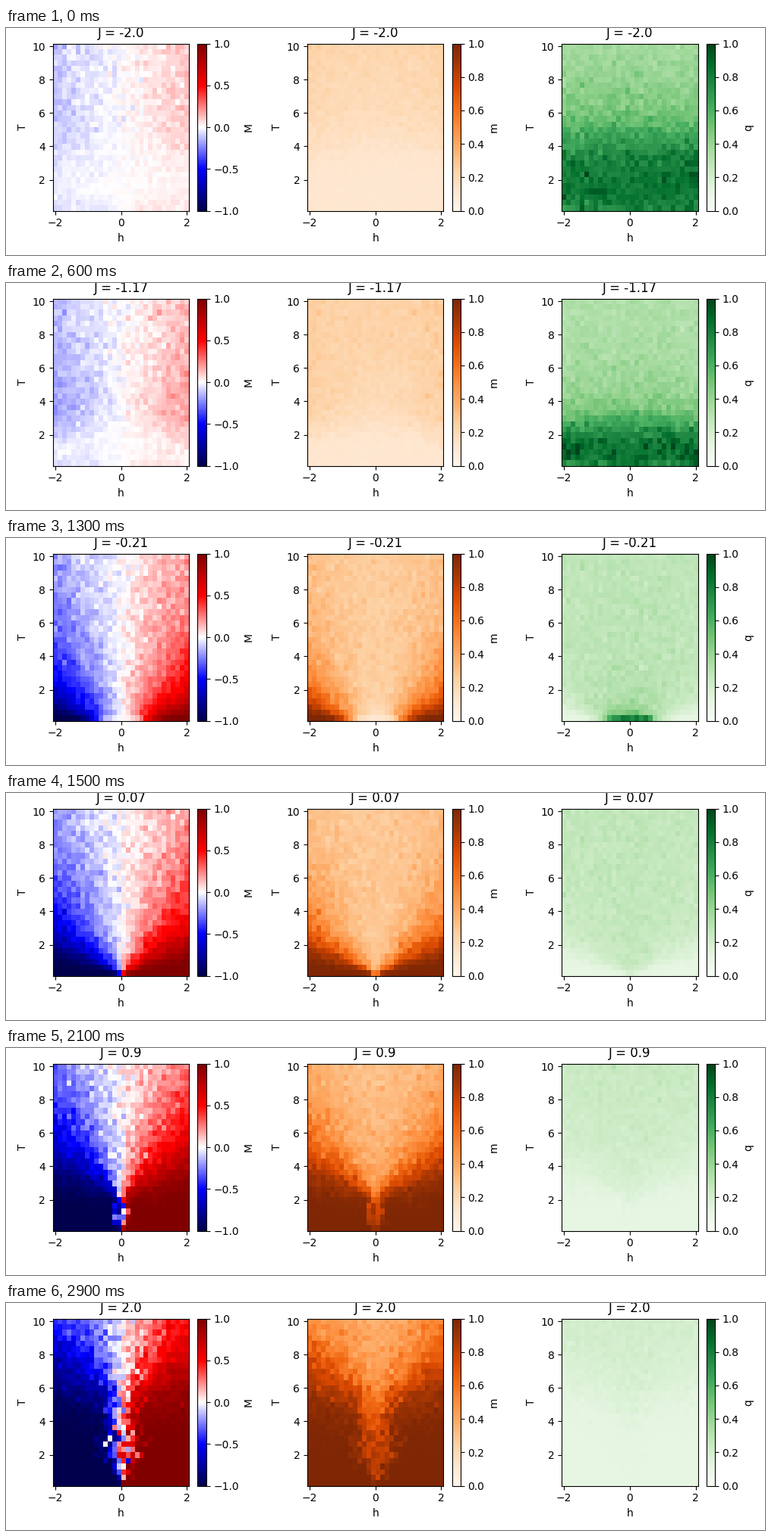
Recreate the animation shown at these times as a matplotlib script. Size 1000 px wide and 300 px high, loop 3 s.

```python
import numpy as np
import matplotlib.pyplot as plt
from matplotlib.animation import FuncAnimation

FRAMES, INTERVAL = 30, 100
SIZE, SWEEPS = 20, 10

couplings = np.linspace(-2, 2, FRAMES)
fields = np.linspace(-2, 2, 30)
temps = np.linspace(0.3, 10, 30)

rng = np.random.default_rng(7)
cells = fields.size * temps.size
shape = (cells, SIZE, SIZE)
count = cells * SIZE * SIZE
noise_pool = rng.logistic(0, 0.5, 4 * count).astype(np.float32)

T, H = np.meshgrid(temps, fields, indexing="ij")
T = T.reshape(-1, 1, 1).astype(np.float32)
H = H.reshape(-1, 1, 1).astype(np.float32)
parity = np.indices((SIZE, SIZE)).sum(axis=0) % 2
stagger = (1 - 2 * parity).astype(np.int8)


def neighbour_sum(spins):
    return sum(np.roll(spins, step, axis) for axis in (1, 2) for step in (-1, 1))


def local_order(spins):
    """Mean absolute magnetisation of all 3x3 windows."""
    for axis in (1, 2):
        spins = spins + np.roll(spins, 1, axis) + np.roll(spins, -1, axis)
    return np.abs(spins).mean(axis=(1, 2)) / 9


def simulate(J):
    """Quench random Ising lattices with heat-bath sweeps, one per (T, h)."""
    spins = (2 * rng.integers(0, 2, shape) - 1).astype(np.int8)
    for _ in range(SWEEPS):
        for colour in (0, 1):
            start = rng.integers(0, 3 * count)
            noise = noise_pool[start:start + count].reshape(shape)
            up = np.float32(J) * neighbour_sum(spins) + H + T * noise > 0
            spins = np.where(parity == colour, 2 * up.astype(np.int8) - 1, spins)
            spins = spins.astype(np.int8)
    grids = spins.mean(axis=(1, 2)), local_order(spins), local_order(spins * stagger)
    return [g.reshape(temps.size, fields.size) for g in grids]


results = [simulate(J) for J in couplings]

fig, axes = plt.subplots(1, 3, figsize=(10, 3), dpi=100)
panels = [("M", "seismic", -1), ("m", "Oranges", 0), ("q", "Greens", 0)]
meshes = []
for ax, (label, cmap, low), grid in zip(axes, panels, results[0]):
    mesh = ax.pcolormesh(fields, temps, grid, cmap=cmap, vmin=low, vmax=1)
    fig.colorbar(mesh, ax=ax, label=label)
    ax.set_xlabel("h")
    ax.set_ylabel("T")
    meshes.append(mesh)
fig.tight_layout()


def update(i):
    for ax, mesh, grid in zip(axes, meshes, results[i]):
        mesh.set_array(grid)
        ax.set_title(f"J = {round(float(couplings[i]), 2)}")
    return meshes


anim = FuncAnimation(fig, update, frames=FRAMES, interval=INTERVAL, repeat=True)
plt.show()
```
